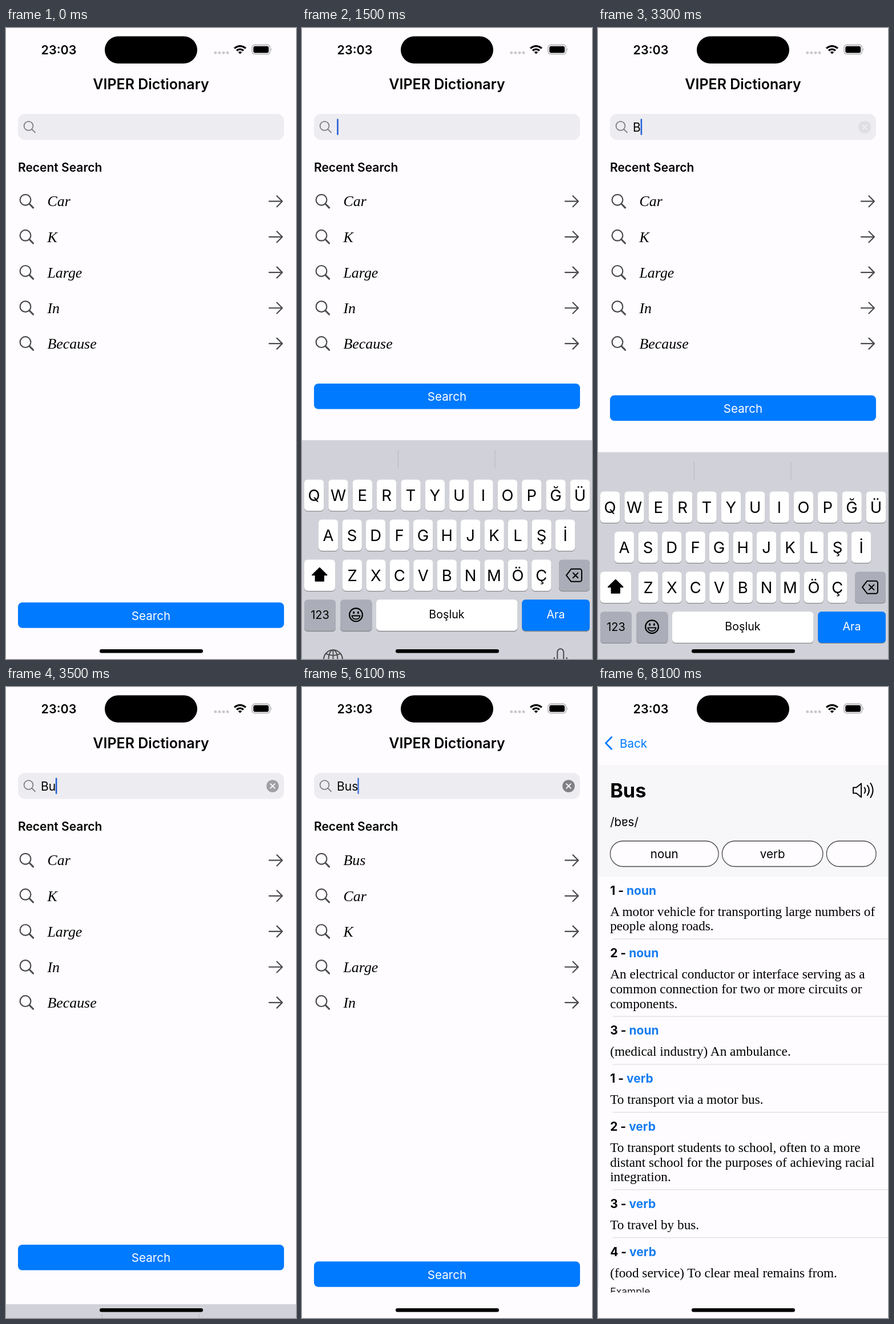
An HTML page for the animation above (8200 ms loop, 508 by 1102 pixels).

```html
<!DOCTYPE html>
<html lang="en">
<head>
<meta charset="utf-8">
<title>Dictionary search</title>
<style>
  html, body { margin: 0; width: 100%; height: 100%; overflow: hidden; background: #fefcff; }
  svg { display: block; width: 508px; height: 1102px; font-family: Inter, Roboto, sans-serif; }
  .mid { text-anchor: middle; }
  .serif { font-family: "Liberation Serif", serif; }
  .line { fill: none; stroke-linecap: round; stroke-linejoin: round; }
</style>
</head>
<body>
<svg id="stage" viewBox="0 0 508 1102"></svg>
<script>
const LOOP = 8200, STEP = 100;
const W = 508, H = 1102;
const BLUE = '#007aff', PAPER = '#fefcff', ICON = '#4b4b4e';

// --- markup helpers ---
const text = (x, y, size, s, attrs = '') =>
  `<text x="${x}" y="${y}" font-size="${size}" ${attrs}>${s}</text>`;
const mid = (x, y, size, s, attrs = '') => text(x, y, size, s, `class="mid" ${attrs}`);
const box = (x, y, w, h, r, fill, attrs = '') =>
  `<rect x="${x}" y="${y}" width="${w}" height="${h}" rx="${r}" fill="${fill}" ${attrs}/>`;
const line = (d, color, width, attrs = '') =>
  `<path class="line" d="${d}" stroke="${color}" stroke-width="${width}" ${attrs}/>`;
const group = (id, body, attrs = '') => `<g id="${id}" ${attrs}>${body}</g>`;

// --- search screen ---
const ROW_Y = 302.7, ROW_GAP = 62.1;

function listRow(i) {
  const y = ROW_Y + i * ROW_GAP;
  return `<circle cx="34" cy="${y - 2.5}" r="9.4" fill="none" stroke="${ICON}" stroke-width="2.2"/>`
    + line(`M41 ${y + 4.5}L47.6 ${y + 11.2}`, ICON, 3)
    + text(72.5, y + 8.7, 25.85, '', 'class="serif word" font-style="italic"')
    + line(`M461 ${y}H484M474.5 ${y - 9.5}L484 ${y}L474.5 ${y + 9.5}`, ICON, 2.2);
}

function homeScreen() {
  const field = box(21, 150, 466, 45.5, 12, '#edecf0')
    + '<circle cx="39.5" cy="171" r="7.9" fill="none" stroke="#808085" stroke-width="1.8"/>'
    + line('M45.5 177L51 182.4', '#808085', 2)
    + text(61, 181, 21, '', 'id="query"')
    + box(0, 158.5, 2.6, 28.5, 1.3, '#2461d6', 'id="caret"')
    + group('clear', '<circle cx="467" cy="173" r="10.8" fill="#808085"/>'
      + line('M463.2 169.2l7.6 7.6m0-7.6l-7.6 7.6', '#fff', 1.9));
  const button = box(21, 1003.3, 466, 44.5, 7.5, BLUE)
    + mid(254, 1033.6, 20.6, 'Search', 'fill="#fff"');
  return box(0, 0, W, H, 0, PAPER) + field
    + text(21, 251, 21, 'Recent Search', 'font-weight="600"')
    + [0, 1, 2, 3, 4].map(listRow).join('')
    + group('button', button);
}

// --- keyboard, laid out at its resting place ---
const key = (x, y, w, fill = '#fff') =>
  box(x, y + 1.3, w, 54.5, 6, '#898a8e') + box(x, y, w, 54.5, 6, fill);

const keyRow = (letters, x, y, pitch) => [...letters].map((c, i) =>
  key(x + i * pitch, y, 34.3) + mid(x + i * pitch + 17.1, y + 37.7, 27.5, c)).join('');

function keyboard() {
  const GREY = '#abaeb8';
  const shift = '<path d="M30.8 890.5L43.5 903H38V913.5H23.6V903H18Z" stroke="#000" stroke-width="2" stroke-linejoin="round"/>';
  const erase = line('M471.5 892.5H486.5a3.5 3.5 0 0 1 3.5 3.5V911a3.5 3.5 0 0 1 -3.5 3.5H471.5L463 903.5ZM474.8 899.3l8.6 8.6m0-8.6l-8.6 8.6', '#000', 2);
  const smile = '<circle cx="94.5" cy="972.5" r="11.4" fill="none" stroke="#000" stroke-width="2.2"/>'
    + '<ellipse cx="90.6" cy="968.6" rx="1.6" ry="2.2"/><ellipse cx="98.4" cy="968.6" rx="1.6" ry="2.2"/>'
    + line('M87.5 974.2H101.5C101 982 88 982 87.5 974.2Z', '#000', 1.9);
  const globe = line('M38 1050.5H71M54.5 1034V1067M42.3 1040.5Q54.5 1046.5 66.7 1040.5M42.3 1060.5Q54.5 1054.5 66.7 1060.5', ICON, 1.9)
    + `<circle cx="54.5" cy="1050.5" r="16.5" fill="none" stroke="${ICON}" stroke-width="2"/>`
    + `<ellipse cx="54.5" cy="1050.5" rx="8" ry="16.5" fill="none" stroke="${ICON}" stroke-width="1.9"/>`;
  const mic = box(447.3, 1032, 11, 24, 5.5, 'none', `stroke="${ICON}" stroke-width="2"`)
    + line('M441.8 1047.5V1050a11 11 0 0 0 22 0V1047.5M452.8 1061V1067M446 1067H459.6', ICON, 2);
  return box(0, 667.5, W, 500, 0, '#d1d2d9')
    + line('M168.5 685V716M338 685V716', '#babbc1', 1.2)
    + keyRow('QWERTYUIOPĞÜ', 4, 736.3, 42.35)
    + keyRow('ASDFGHJKLŞİ', 29, 806.2, 41.5)
    + keyRow('ZXCVBNMÖÇ', 71, 876.2, 41.4)
    + key(4, 876.2, 54) + shift
    + key(450, 876.2, 54, GREY) + erase
    + key(4, 946, 55, GREY) + mid(31.5, 980, 20, '123')
    + key(67, 946, 55.5, GREY) + smile
    + key(130, 946, 247.5) + mid(253.5, 978.5, 19.7, 'Boşluk')
    + key(385.3, 946, 118.7, BLUE) + mid(444.5, 978.5, 19.7, 'Ara', 'fill="#fff"')
    + globe + mic;
}

// --- word screen ---
const MEANINGS = [
  ['1', 'noun', 'A motor vehicle for transporting large numbers of', 'people along roads.'],
  ['2', 'noun', 'An electrical conductor or interface serving as a', 'common connection for two or more circuits or', 'components.'],
  ['3', 'noun', '(medical industry) An ambulance.'],
  ['1', 'verb', 'To transport via a motor bus.'],
  ['2', 'verb', 'To transport students to school, often to a more', 'distant school for the purposes of achieving racial', 'integration.'],
  ['3', 'verb', 'To travel by bus.'],
  ['4', 'verb', '(food service) To clear meal remains from.']
];

function meanings() {
  const LEAD = 25.75;
  let y = 362.5, out = '';
  MEANINGS.forEach(([n, kind, ...lines], i) => {
    out += text(21, y, 21, `${n} - <tspan fill="#147cf0">${kind}</tspan>`, 'font-weight="700"');
    lines.forEach((s, k) => out += text(21, y + 37.2 + k * LEAD, 23.27, s, 'class="serif"'));
    const end = y + 26 + lines.length * LEAD;
    if (i < MEANINGS.length - 1) out += box(25.5, end - 0.6, W - 25.5, 1.2, 0, '#dddce0');
    y = end + 32;
  });
  return out + text(21, 1062.3, 17.5, 'Example', 'fill="#1c1c1e"');
}

function wordScreen() {
  const pill = (x, w, s) => box(x, 269, w, 44.5, 22.2, PAPER, 'stroke="#48484a" stroke-width="1.3"')
    + mid(x + w / 2, 298.8, 20.6, s);
  const speaker = line('M447 175.5H452.5L461 168.5V192.5L452.5 185.5H447ZM466.5 175.5Q470 180.5 466.5 185.5M471.8 171.8Q477.8 180.5 471.8 189.2M477.2 168Q485.6 180.5 477.2 193', '#000', 2);
  return box(0, 0, W, H, 0, PAPER) + box(0, 136.5, W, 194.5, 0, '#f7f6f9')
    + text(21, 192.5, 34.3, 'Bus', 'font-weight="700"') + speaker
    + text(21, 243, 20.5, '/bɐs/')
    + pill(21.3, 189.7, 'noun') + pill(217.3, 176.5, 'verb') + pill(400.3, 86.7, '')
    + `<clipPath id="body"><rect y="331" width="${W}" height="726.5"/></clipPath>`
    + `<g clip-path="url(#body)">${meanings()}</g>`;
}

// --- status bar and home indicator ---
function chrome() {
  const arc = r => {
    const d = r * Math.SQRT1_2;
    return `M${410 - d} ${45.5 - d}A${r} ${r} 0 0 1 ${410 + d} ${45.5 - d}`;
  };
  return mid(92.5, 45.7, 21.5, '23:03', 'font-weight="600"')
    + box(173, 14.5, 162, 47.5, 23.7, '#000')
    + [364.5, 371.6, 378.7, 385.8].map(x => box(x, 41, 4.6, 4.6, 1.4, '#c9c8cc')).join('')
    + `<path d="${arc(13.9)}${arc(8.4)}" fill="none" stroke="#000" stroke-width="3.3"/>`
    + `<path d="${arc(4.6)}L410 45.5Z"/>`
    + box(431, 29.5, 31.5, 16.2, 5, 'none', 'stroke="#a5a4a8" stroke-width="1.3"')
    + box(433.3, 31.8, 26.9, 11.6, 3.2, '#000')
    + '<path d="M464.2 35q2.2 2.5 0 5Z" fill="#a5a4a8"/>'
    + box(164, 1085, 181, 6.6, 3.3, '#000');
}

const stage = document.getElementById('stage');
stage.innerHTML = group('home', homeScreen())
  + group('keys', keyboard())
  + box(0, 0, W, H, 0, '#000', 'id="shade"')
  + group('word', wordScreen())
  + mid(254, 106.5, 25, 'VIPER Dictionary', 'id="title" font-weight="600"')
  + line('M23.8 87.5L13.6 98L23.8 108.5', BLUE, 2.7, 'id="chevron"')
  + text(38, 105.5, 20.6, 'Back', `id="back" fill="${BLUE}"`)
  + chrome();

const el = id => document.getElementById(id);
const [home, keys, shade, word, title, chevron, back, button, query, caret, clear] =
  ['home', 'keys', 'shade', 'word', 'title', 'chevron', 'back', 'button', 'query', 'caret', 'clear'].map(el);
const words = [...document.querySelectorAll('.word')];

// --- timing ---
const KEYS_IN = 1299, KEYS_OUT = 3260, RELOAD = 5300, PUSH = 7510.5;
// [start, typed text, caret x]
const TYPING = [[0, '', 61.2], [3200, 'B', 74.6], [3400, 'Bu', 86.8], [3600, 'Bus', 97.2]];
const RECENT = ['Car', 'K', 'Large', 'In', 'Because'];

const clamp = v => Math.min(1, Math.max(0, v));
const ramp = (t, from, to) => clamp((t - from) / (to - from));
// critically damped spring: mass 3, stiffness 1000
function spring(ms) {
  const x = Math.max(0, ms) / 1000 * Math.sqrt(1000 / 3);
  return 1 - (1 + x) * Math.exp(-x);
}
// one second blink: fade out, pause, fade in, stay
function blink(ms) {
  if (ms < 0) return 1;
  const p = ms % 1000;
  return p < 350 ? 1 - ramp(p, 0, 160) : ramp(p, 350, 530);
}
function caretAlpha(t) {
  if (t < KEYS_IN) return 0;
  return t < TYPING[1][0] ? blink(t - 1840) : blink(t - 4070);
}
const move = (node, x, y) => node.setAttribute('transform', `translate(${x.toFixed(2)} ${y.toFixed(2)})`);
const fade = (node, a) => node.setAttribute('opacity', a.toFixed(3));
const write = (node, s) => { if (node.textContent !== s) node.textContent = s; };

function draw(t) {
  const up = t < KEYS_OUT ? spring(t - KEYS_IN) : 1 - spring(t - KEYS_OUT);
  move(button, 0, -434 * up);
  move(keys, 0, 440 * (1 - up));

  const [, typed, x] = TYPING.filter(s => t >= s[0]).pop();
  write(query, typed);
  move(caret, x, 0);
  fade(caret, caretAlpha(t));
  fade(clear, ramp(t, 3260, 3600));

  const list = t < RELOAD ? RECENT : ['Bus', ...RECENT];
  words.forEach((node, i) => write(node, list[i]));

  const p = spring(t - PUSH);
  move(home, -0.3 * W * p, 0);
  move(word, W * (1 - p), 0);
  move(title, -112 * p, 0);
  move(back, 125 * (1 - p), 0);
  fade(shade, 0.1 * p);
  fade(title, 1 - p ** 1.2);
  fade(back, p);
  fade(chevron, p);
}

function tick() {
  const t = performance.now() % LOOP;
  draw(Math.floor(t / STEP) * STEP);
  requestAnimationFrame(tick);
}
tick();
</script>
</body>
</html>
```
